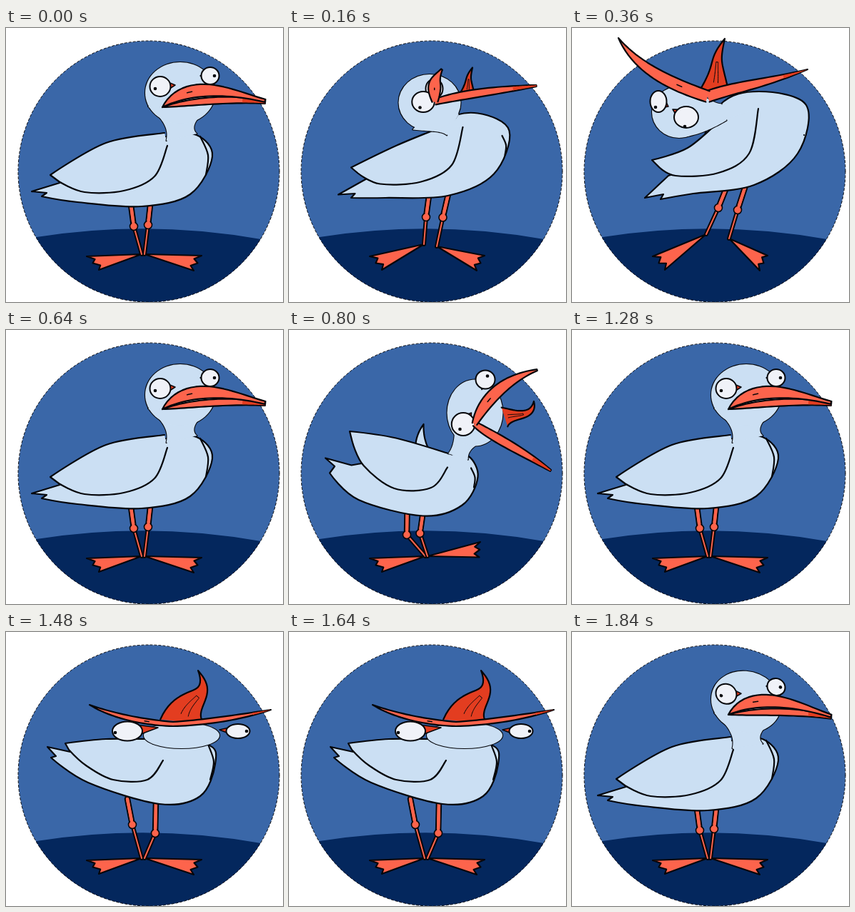
Write an HTML page with a canvas that moves like this. It is 388x384 px and loops after 1920 ms.

```html
<!DOCTYPE html>
<html lang="en">
<meta charset="utf-8">
<title>Yawning seagull</title>
<style>
  html, body { margin: 0; overflow: hidden; background: #fff; }
  canvas { display: block; }
</style>
<canvas id="stage" width="388" height="384"></canvas>
<script>
const ctx = document.getElementById('stage').getContext('2d');
const INK = '#05060a', FEATHER = '#cbdff3', ORANGE = '#fd644c', THROAT = '#e33d20';
const TAU = 2 * Math.PI;

// Key points of each part: idle, folded back, lunging, wide brim.
// A short list repeats, so a single point collapses the part.
const OUTLINES = {
  body: [
    '36 229 85 214 150 175 225 152 267 150 289 180 258 233 190 250 100 244 50 236 57 231',
    '102 238 135 207 170 185 207 108 262 89 328 108 316 176 255 220 170 232 124 240 128 233',
    '66 130 90 165 150 185 215 197 235 203 240 232 227 258 185 271 95 232 64 165 71 151',
    '58 161 90 168 140 165 200 157 282 158 293 185 272 230 215 241 115 211 63 176 70 174'],
  wing: [
    '222 147 140 161 62 206 74 215 110 230 165 228 208 208 226 165',
    '207 130 162 168 112 185 119 192 145 207 205 203 248 176 261 113',
    '234 202 160 142 108 78 103 97 99 150 130 216 190 234 218 220',
    '200 150 140 150 83 156 88 165 112 187 150 207 198 207 220 180'],
  chest: ['272 152 283 178 280 206', '325 150', '238 235', '284 160 291 182 286 207']
};

// Tapering limbs: a cubic spine given as x, y, half width.
const LIMBS = {
  farWing: ['190 200 0', '230 150 0', '220 205 22 185 160 24 168 120 18 187 64 0', '190 200 0'],
  neck: [
    '246 153 22 243 140 14 243 126 24 243 110 44', '213 118 12 200 122 16 180 122 28 160 118 36',
    '228 202 7 238 192 5 250 180 6 270 165 14', '245 150 20 245 147 20 245 143 20 245 140 20'],
  upperBeak: [
    '219 111 0 256 74 18 310 88 3 363 102 2', '190 96 8 150 82 9 95 62 9 65 14 0',
    '301 152 7 299 105 9 312 45 9 332 10 0', '234 129 3 195 127 4 150 118 4 117 102 0'],
  lowerBeak: [
    '219 111 0 255 104 6 310 97 6 363 104 2', '190 96 8 230 82 8 270 78 6 330 58 0',
    '301 152 7 306 190 9 340 240 8 370 290 0', '234 129 3 280 127 4 330 119 4 371 109 0'],
  pouch: [
    '300 96 0', '200 88 20 206 45 3 198 48 9 214 15 0',
    '304 148 28 335 138 4 385 152 14 386 104 0', '248 126 32 252 90 14 292 92 8 269 54 0']
};

const JOINTS = {
  // Hip, knee, ankle.
  legL: ['175 248 179 278 190 317', '217 222 205 252 188 289', '156 266 151 296 192 317', '170 234 177 270 190 317'],
  legR: ['202 248 199 276 194 317', '244 218 232 255 220 295', '173 266 168 294 194 317', '210 238 209 282 194 317'],
  // Outer toes.
  toesL: ['113 320 130 339', '113 320 130 339', '113 320 130 339', '113 320 130 339'],
  toesR: ['274 319 263 340', '274 319 263 340', '262 275 270 297', '274 319 263 340'],
  // Centre and radii.
  skull: ['244 91 49 43', '150 118 38 36', '277 141 29 50', '246 145 53 18'],
  // Centre, radii, pupil, outer corner of the lid.
  eyeFar: [
    '286 67 12.5 12 292 67 272 67', '121 103 11.5 15 117 111 135 110',
    '264 72 14.5 14 264 62 268 100', '325 139 16.5 10 337 139 299 137'],
  eyeNear: [
    '216 82 14.5 14 209 85 237 80', '160 125 17 15 158 138 141 114',
    '272 182 18 18 270 193 274 152', '170 139 21 13.5 153 141 213 134']
};

const parts = Object.fromEntries(
  Object.entries({ ...OUTLINES, ...LIMBS, ...JOINTS }).map(([name, poses]) =>
    [name, poses.map(text => text.split(' ').map(Number))]));

// Every yawn holds its drawings on the same beat: [ms, amount].
const YAWN = 640, SETTLE = 560;
const BEATS = [[0, 0], [120, .12], [160, .5], [200, 1], [280, 1.05], [360, 1], [480, .5], [SETTLE, 0]];

let pose = 1, amount = 0;

function numbers(name) {
  const idle = parts[name][0], target = parts[name][pose];
  const length = Math.max(idle.length, target.length);
  return Array.from({ length }, (_, i) => {
    const from = idle[i % idle.length];
    return from + (target[i % target.length] - from) * amount;
  });
}

function fill(path, color) {
  ctx.fillStyle = color;
  ctx.fill(path);
}

function stroke(path, width = 2.2, color = INK) {
  ctx.lineWidth = width;
  ctx.strokeStyle = color;
  ctx.stroke(path);
}

function paint(path, color, width) {
  fill(path, color);
  stroke(path, width);
}

function polyline(points, closed) {
  const path = new Path2D();
  for (const p of points) path.lineTo(...p);
  if (closed) path.closePath();
  return path;
}

function oval(x, y, rx, ry) {
  const path = new Path2D();
  path.ellipse(x, y, rx, ry, 0, 0, TAU);
  return path;
}

// Smooth curve through key points; corners have no tangent.
function outline(name, corners = [], closed = false) {
  const v = numbers(name), n = v.length / 2, path = new Path2D();
  const at = i => {
    const k = closed ? (i + n) % n : Math.min(Math.max(i, 0), n - 1);
    return [v[2 * k], v[2 * k + 1]];
  };
  const handle = (i, sign) => {
    if (corners.includes(i % n)) return at(i);
    const before = at(i - 1), after = at(i + 1);
    return at(i).map((c, k) => c + sign * (after[k] - before[k]) / 6);
  };
  path.moveTo(...at(0));
  for (let i = 0; i < (closed ? n : n - 1); i++)
    path.bezierCurveTo(...handle(i, 1), ...handle(i + 1, -1), ...at(i + 1));
  return path;
}

function spine(v, t) {
  const s = 1 - t, weights = [s * s * s, 3 * s * s * t, 3 * s * t * t, t * t * t];
  return [0, 1, 2].map(k => weights.reduce((sum, w, i) => sum + w * v[3 * i + k], 0));
}

// Limb between two places on its spine; left open at the base.
function limb(name, from = 0, to = 1, thickness = 1) {
  const v = numbers(name), left = [], right = [], steps = 24;
  for (let i = 0; i <= steps; i++) {
    const t = from + (to - from) * i / steps;
    const [x, y, half] = spine(v, t);
    const [x1, y1] = spine(v, t - .01), [x2, y2] = spine(v, t + .01);
    const k = half * thickness / (Math.hypot(x2 - x1, y2 - y1) || 1);
    left.push([x + (y2 - y1) * k, y - (x2 - x1) * k]);
    right.unshift([x - (y2 - y1) * k, y + (x2 - x1) * k]);
  }
  return polyline([...left, ...right]);
}

function leg(side) {
  const [hx, hy, kx, ky, ax, ay] = numbers('leg' + side);
  const [x1, y1, x2, y2] = numbers('toes' + side);
  // Three toes: notches between them are pulled towards the ankle.
  const toes = [0, .25, .5, .75, 1].map((t, i) => {
    const pull = i % 2 ? .1 : 0, x = x1 + (x2 - x1) * t, y = y1 + (y2 - y1) * t;
    return [x + (ax - x) * pull, y + (ay - y) * pull];
  });
  paint(polyline([[ax, ay], ...toes], true), ORANGE);

  const thigh = polyline([[hx, hy], [kx, ky]]), shin = polyline([[kx, ky], [ax, ay]]);
  for (const [color, extra] of [[INK, 4], [ORANGE, 0]]) {
    stroke(thigh, 4.5 + extra, color);
    stroke(shin, 2 + extra, color);
  }
  paint(oval(kx, ky, 5.5, 5.5), ORANGE, 1.6);
  stroke(thigh, 4, ORANGE);
}

function eye(name) {
  const [x, y, rx, ry, px, py, tx, ty] = numbers(name);
  const dx = tx - x, dy = ty - y, k = ry * .8 / Math.hypot(dx, dy);
  paint(polyline([[tx, ty], [x - dy * k, y + dx * k], [x + dy * k, y - dx * k]], true), THROAT, 1.5);
  paint(oval(x, y, rx, ry), '#f0f2f8', 2);
  fill(oval(px, py, 2.3, 2.3), INK);
}

function backdrop() {
  const disc = oval(200, 201, 183, 183);
  ctx.clearRect(0, 0, 388, 384);
  fill(disc, '#3a67a8');
  ctx.save();
  ctx.clip(disc);
  fill(new Path2D('M0 300L43 293Q200 268 357 296L388 302V384H0Z'), '#04275d');
  ctx.restore();
  ctx.setLineDash([3, 3]);
  stroke(disc, 1);
  ctx.setLineDash([]);
}

function head() {
  const neck = limb('neck'), skull = oval(...numbers('skull'));
  stroke(neck);
  stroke(skull);
  fill(neck, FEATHER);
  fill(skull, FEATHER);
  eye('eyeFar');
  eye('eyeNear');
  paint(limb('pouch'), THROAT);
  stroke(limb('pouch', .1, .5, .2), 1);
  paint(limb('lowerBeak'), ORANGE);
  fill(limb('lowerBeak', .8, 1, .75), THROAT);
  paint(limb('upperBeak'), ORANGE);
  stroke(limb('upperBeak', .28, .33, 0), 1.5);
}

function draw() {
  const now = performance.now(), t = now % YAWN;
  pose = 1 + Math.floor(now / YAWN) % 3;
  amount = BEATS.findLast(([start]) => start <= t)[1];
  ctx.lineJoin = ctx.lineCap = 'round';

  backdrop();
  leg('L');
  leg('R');
  paint(limb('farWing'), FEATHER);
  paint(outline('body', [0, 1, 9, 10], true), FEATHER);
  stroke(outline('chest'));
  paint(outline('wing', [2, 3]), FEATHER);

  // The head nods as it settles: a shear that grows towards the beak tip.
  ctx.save();
  if (t >= SETTLE) ctx.transform(1, .075, 0, 1, 0, -11.5);
  head();
  ctx.restore();
  requestAnimationFrame(draw);
}
draw();
</script>
</html>
```
